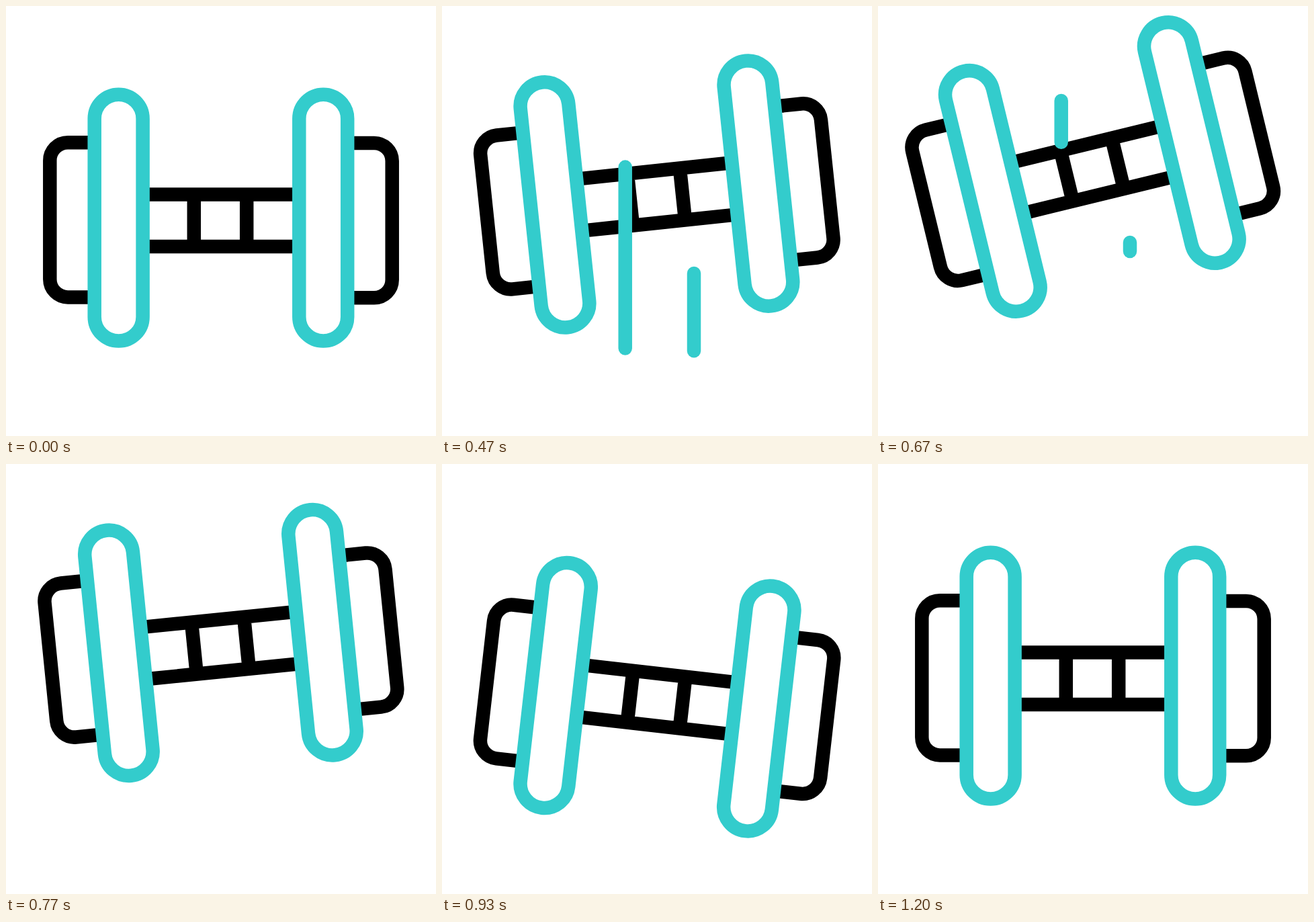
An HTML page for the animation above (1.67 s loop, 640x640 px).

```html
<!DOCTYPE html>
<html lang="en">
<head>
<meta charset="utf-8">
<title>Dumbbell</title>
<style>
  html, body { margin: 0; width: 100%; height: 100%; overflow: hidden; background: #fff; }
  svg { display: block; width: 100%; height: 100%; fill: none; stroke-width: 20.5; }
  .bars { stroke: #000; }
  .plates { stroke: #33cccc; fill: #fff; }
  .streaks { stroke: #33cccc; stroke-linecap: round; }
</style>
</head>
<body>
<svg viewBox="0 0 640 640">
  <g id="dumbbell">
    <g class="bars">
      <path d="M132 203.3H92a26.7 26.7 0 0 0-26.7 26.7V406.7a26.7 26.7 0 0 0 26.7 26.7H132"/>
      <path d="M508 204H548a26.7 26.7 0 0 1 26.7 26.7V407.5a26.7 26.7 0 0 1-26.7 26.7H508"/>
      <path d="M204 280.5H436M204 358H436M279.8 280V358M358.2 280V358"/>
    </g>
    <g class="plates">
      <rect x="131.7" y="131.8" width="71.9" height="366.8" rx="35.95"/>
      <rect x="436.3" y="131.8" width="71.9" height="366.8" rx="35.95"/>
    </g>
  </g>
  <g class="streaks">
    <path id="left"/>
    <path id="right"/>
  </g>
</svg>
<script>
  const LOOP = 1670, START = 300, FPS = 30, LAST = 27;
  const byId = id => document.getElementById(id);

  // Cubic easing with flat ends; a and b are the horizontal handle positions.
  function ease(x, a = 0.364, b = 0.636) {
    let lo = 0, hi = 1, t = 0.5;
    for (let i = 0; i < 30; i++) {
      t = (lo + hi) / 2;
      const u = 1 - t;
      if (3 * u * u * t * a + 3 * u * t * t * b + t * t * t < x) lo = t;
      else hi = t;
    }
    return t * t * (3 - 2 * t);
  }

  // Keys: [step, value, handle a, handle b], handles shape the way to the next key.
  function track(keys, step) {
    if (step <= keys[0][0]) return keys[0][1];
    for (let i = 1; i < keys.length; i++) {
      const [s0, v0, a, b] = keys[i - 1], [s1, v1] = keys[i];
      if (step < s1) return v0 + (v1 - v0) * ease((step - s0) / (s1 - s0), a, b);
    }
    return keys[keys.length - 1][1];
  }

  const lift = [[0, 0, 0.42, 0.51], [11, -75.9, 0.79, 0.785], [17, 63], [21, 0]];
  const tilt = [[0, 0, 0.42, 0.55], [11, -13.66], [18, 6.7], [LAST, 0]];

  const streaks = [
    { el: byId("left"), x: 272.7, head: [[-0.95, 509.6], [8.15, 141]], tail: [[5, 509.6], [13.2, 141]] },
    { el: byId("right"), x: 375, head: [[0, 513.2], [7.8, 352]], tail: [[5, 513.2], [12.35, 352]] }
  ];

  function draw(ms) {
    const tick = Math.floor(ms / 10) * 10 + 5;
    const step = Math.floor((tick - START) * FPS / 1000);
    byId("dumbbell").setAttribute("transform",
      `translate(0 ${track(lift, step)}) rotate(${track(tilt, step)} 320 320)`);
    for (const { el, x, head, tail } of streaks) {
      const visible = step >= 0 && step < tail[1][0];
      el.setAttribute("d", visible ? `M${x} ${track(tail, step) + 0.01}V${track(head, step)}` : "");
    }
  }

  const begin = performance.now();
  function loop() {
    draw((performance.now() - begin) % LOOP);
    requestAnimationFrame(loop);
  }
  loop();
</script>
</body>
</html>
```
